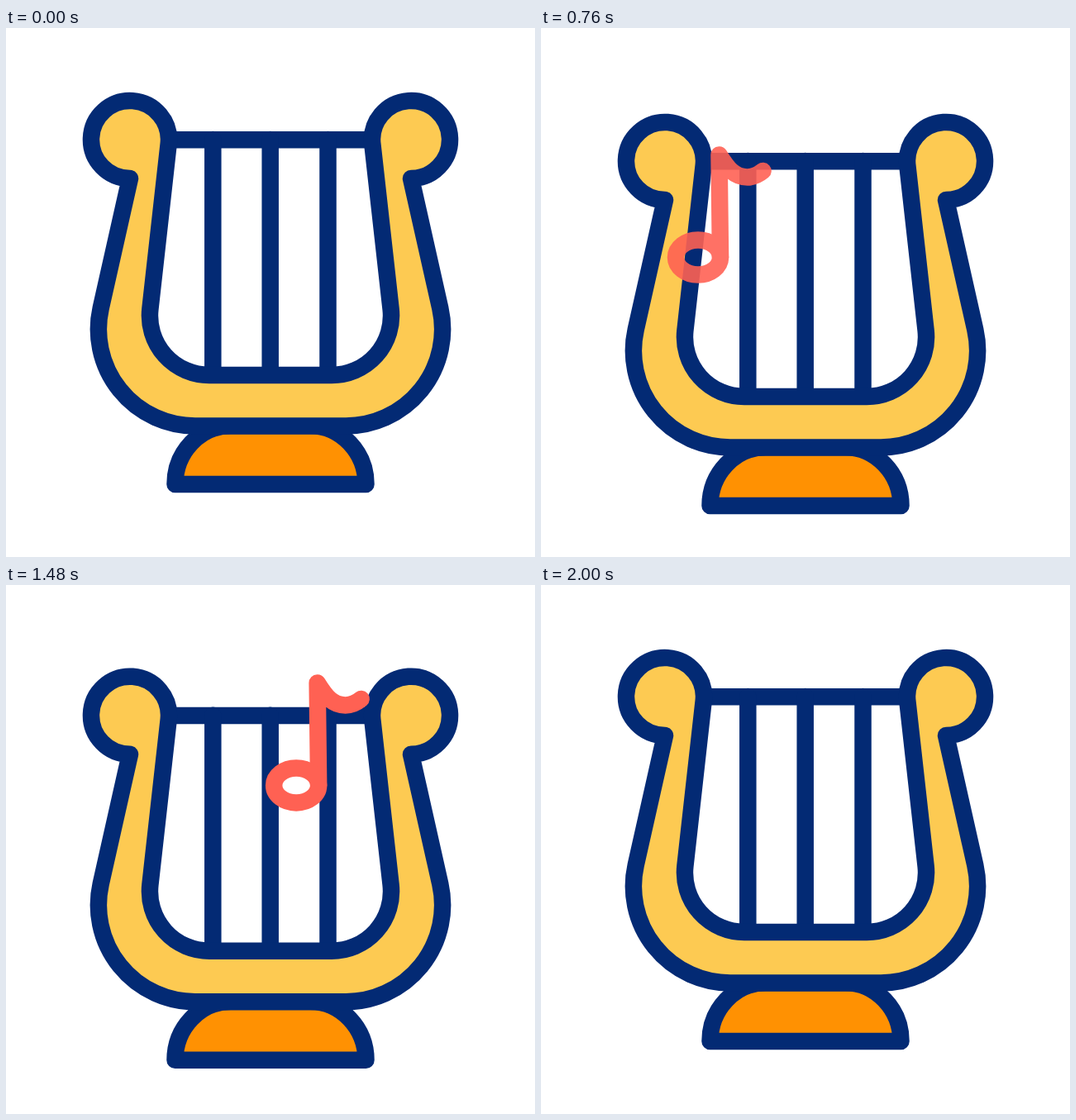
Recreate the animation shown at these times as an HTML page. Size 640 px wide and 640 px high, loop 2.4 s.

```html
<!DOCTYPE html>
<html lang="en">
<head>
<meta charset="utf-8">
<title>Lyre</title>
<style>
html, body { margin: 0; width: 100%; height: 100%; overflow: hidden; background: #fff; }
svg { display: block; width: 100vw; height: 100vh; }
path, ellipse { fill: none; stroke-width: 20.5; stroke-linecap: round; stroke-linejoin: round; }
#lyre path { stroke: #032a74; }
.note { stroke: #ff6153; }
</style>
</head>
<body>
<svg viewBox="0 0 640 640">
  <g id="lyre">
    <path style="fill:#ff9102" d="M204.5 552A68 71 0 0 1 272 481H368A68 71 0 0 1 435.5 552Z"/>
    <path d="M197 135.3H443"/>
    <path class="string"/>
    <path class="string"/>
    <path class="string"/>
    <path style="fill:#fdca52" d="M150 182A47 47 0 1 1 196.7 140L174.4 340A72 72 0 0 0 246 420H394A72 72 0 0 0 465.6 340L443.3 140A47 47 0 1 1 490 182L525.3 339A117 117 0 0 1 411 481.5H229A117 117 0 0 1 114.7 339Z"/>
  </g>
  <g class="note"><path d="M1.5 124L0 0C10 16 18 27 34 27Q44 27 53 19.5"/><ellipse cx="-25.5" cy="124" rx="27" ry="21"/></g>
  <g class="note"><path d="M1.5 124L0 0C10 16 18 27 34 27Q44 27 53 19.5"/><ellipse cx="-25.5" cy="124" rx="27" ry="21"/></g>
</svg>
<script>
const LOOP = 2400, FRAME = 40, SWING = 80, PLUCK = 12;
const lyre = document.getElementById('lyre');
const strings = document.querySelectorAll('.string');
const notes = document.querySelectorAll('g.note');

const stringX = [250.3, 319.7, 389.5];
const plucks = [[210, 1200], [290, 1573], [400, 1493]];
const noteSpecs = [
  { start: 200, end: 1100, fadeIn: 350, fadeOut: 380, x: 231.3, y: 270.5, drift: 1 },
  { start: 1080, end: 1950, fadeIn: 330, fadeOut: 460, x: 385.8, y: 202, drift: 0.7 }
];

const clamp = v => Math.max(0, Math.min(1, v));

// Symmetric cubic Bezier ease with handles (a, 0) and (1 - a, 1)
function ease(p, a = 0.57) {
  let lo = 0, hi = 1;
  for (let i = 0; i < 20; i++) {
    const u = (lo + hi) / 2, v = 1 - u;
    if (3 * v * v * u * a + 3 * v * u * u * (1 - a) + u ** 3 < p) lo = u;
    else hi = u;
  }
  return lo * lo * (3 - 2 * lo);
}

// Left, right, back to rest
function swing(t) {
  const p = t / SWING;
  if (p <= 0 || p >= 3) return 0;
  return PLUCK * (p < 1 ? -p : p < 2 ? 2 * p - 3 : 3 - p);
}

function draw(t) {
  const drop = 36.3 * (ease(clamp((t - 280) / 800)) - ease(clamp((t - 1080) / 900)));
  lyre.setAttribute('transform', `translate(0 ${drop})`);

  strings.forEach((s, i) => {
    const x = stringX[i];
    const bend = plucks[i].reduce((sum, start) => sum + swing(t - start), 0);
    s.setAttribute('d', `M${x} 135Q${x + 2 * bend} 268 ${x} 420`);
  });

  notes.forEach((n, i) => {
    const { start, end, fadeIn, fadeOut, x, y, drift } = noteSpecs[i];
    const age = t - start;
    const nx = x + drift * (2.77e-5 * age * age - 0.0437 * age);
    n.setAttribute('transform', `translate(${nx} ${y - 0.209 * age})`);
    n.setAttribute('opacity', Math.min(clamp(age / fadeIn), clamp((end - t) / fadeOut)));
  });
}

const origin = performance.now();
function tick() {
  const t = (performance.now() - origin) % LOOP;
  draw(Math.floor(t / FRAME) * FRAME);
  requestAnimationFrame(tick);
}
tick();
</script>
</body>
</html>
```
